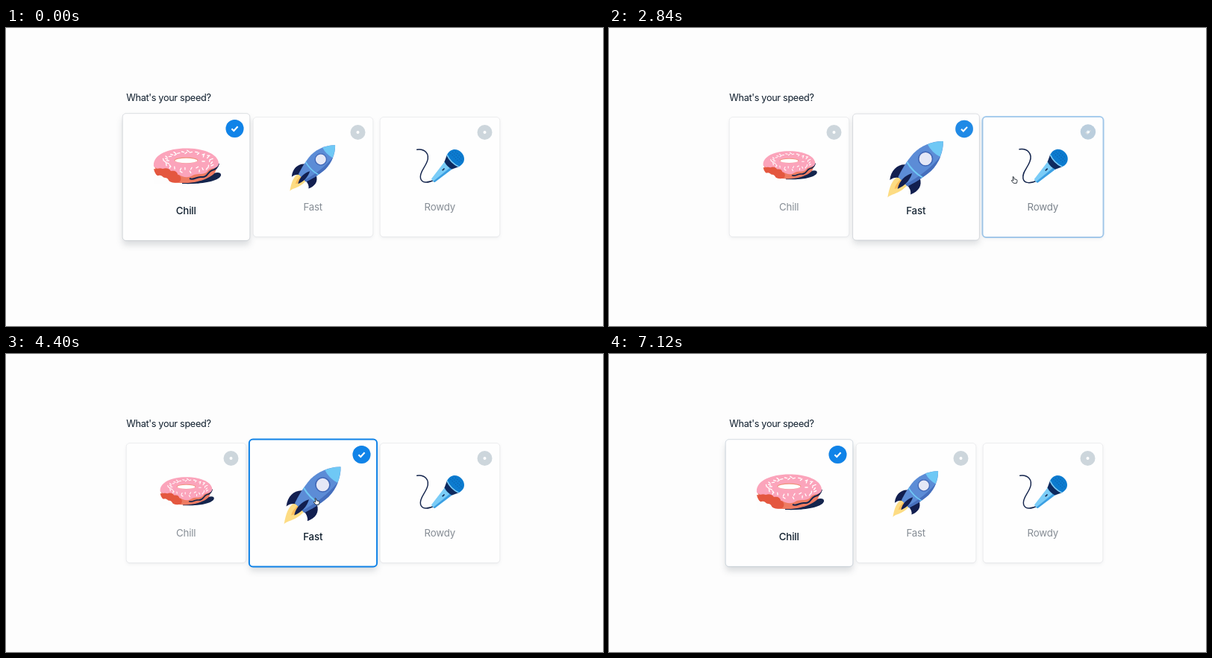
Animation, 800 px wide and 400 px high, one loop 7.52 s. Source, as an HTML page:

```html
<!DOCTYPE html>
<html lang="en">
<head>
<meta charset="utf-8">
<title>Speed picker</title>
<style>
  html, body { margin: 0; height: 100%; overflow: hidden; background: #fdfdfd; }
  svg { display: block; }
  text { font-family: Inter, "Liberation Sans", sans-serif; fill: #0f1e2d; }
  .title { font-size: 12.7px; letter-spacing: -.33px; }
  .label { font-size: 13.3px; letter-spacing: -.2px; text-anchor: middle; }
  .box { fill: #fefefe; }
  .ring { fill: none; stroke: #1083e8; stroke-width: 2; }
</style>
</head>
<body>
<svg id="stage" width="800" height="400" viewBox="0 0 800 400">
  <defs>
    <g id="donut" transform="translate(-241.5 -180)">
      <path fill="#14254d" d="M236 207C256 208 268 203 274 197C281 193 289 193 288 198C285 206 262 210 236 209Z"/>
      <path fill="#ee7b62" d="M199 186C204 201 218 209 240 208C258 208 275 201 280 194L285 182Z"/>
      <path fill="none" stroke="#14254d" stroke-width="2" d="M246 202C252 205 255 199 262 200C270 201 270 193 276 191C282 190 284 186 285 182"/>
      <path fill="#fba4bb" d="M198 186C196 171 216 161.500 241 161.500C268 161.500 285 171 285 182C284 190 275 187 271 191C266 199 256 194 250 198C244 202 236 200 232 197L208 192Z"/>
      <path fill="#e4573f" d="M198 189C202 190 205 187 210 189C215 187 219 189 221 192C226 191 230 193 230 197C235 198 236 204 232 207C225 209 219 207 216 203C214 200 210 203 207 201C204 202 199 195 198 189Z"/>
      <path fill="#fdfdfd" d="M197 193C201 195 201 199 205 198C209 197 210 201 213 201C218 201 218 206 221 209L198 210Z"/>
      <ellipse cx="241.500" cy="177.500" rx="16" ry="4" fill="#f0907a"/>
      <ellipse cx="241.500" cy="178" rx="15" ry="3.200" fill="#fefefe"/>
      <path id="sprinkles" fill="none" stroke="#fff" stroke-width="1.300" stroke-linecap="round"/>
    </g>
    <g id="rocket" transform="translate(-.5 9) rotate(45)">
      <path fill="#fddc83" d="M-9 24C-13 33-7 44 .7 55C1 47 8 42 8 25Z"/>
      <path fill="#fbbd5c" d="M-4 24Q-5 34-1 40Q3 34 4 24Z"/>
      <path fill="#121f50" d="M-13 5C-22 12-23 25-14 36Q-13 28-6 24ZM13 5C23 10 25 19 20 30Q16 24 6 24Z"/>
      <path fill="#5c8cd6" d="M0-53C10-44 17-28 17-13C16 3 12 16 9 25H-9C-12 16-16 3-17-13C-17-28-10-44 0-53Z"/>
      <path fill="#466fbd" d="M12-36C15-29 17-21 17-13C16 3 12 16 9 25H5C11 6 14-16 12-36Z"/>
      <path fill="#6fc8f5" d="M0-53C5-48 9-42 12-35Q0-31-12-35C-9-42-5-48 0-53Z"/>
      <path fill="none" stroke="#6fc8f5" stroke-width="2.200" d="M-15 2Q0 6 15 2"/>
      <path fill="#121f50" d="M1 8C6 17 6 28 2 37C-4 28-4 17 1 8Z"/>
      <circle cy="-19" r="9.500" fill="#e5e8f6" stroke="#4167b6" stroke-width="1.600"/>
    </g>
    <g id="mic" transform="translate(-581.5 -180)">
      <path fill="none" stroke="#14254d" stroke-width="1.800" stroke-linecap="round" d="M543 159C556 157 565 166 560 179C556 190 547 197 549 207C551 216 562 215 572 210"/>
      <g transform="translate(606 175) rotate(45)">
        <path fill="#7accf7" d="M-9 13H9L4 51Q0 53-4 51Z"/>
        <path fill="#3c9fe2" d="M5 13H9L4 51Q2 52 1 52Z"/>
        <path fill="#0e2a5f" d="M-14 4H14L9 15Q0 18-9 15Z"/>
        <path fill="#0c7bcf" d="M-14 4C-18-8-10-16 0-16C10-16 18-8 14 4Q0 8-14 4Z"/>
        <path fill="none" stroke="#0a5daa" stroke-width="1.200" stroke-dasharray="1.500 2.500" d="M-8-10H8M-11-6H11M-12-2H12"/>
        <path fill="none" stroke="#7accf7" stroke-width="2" d="M-14 4Q0 9 14 4"/>
        <path stroke="#14254d" stroke-width="2" d="M-1 23V28"/>
      </g>
    </g>
  </defs>
  <text class="title" x="161.300" y="97.500">What's your speed?</text>
  <g id="cards"></g>
  <g id="cursor" fill="#fff" stroke="#1a222c" stroke-width=".9" stroke-linejoin="round">
    <path id="hand" d="M-2-4.200Q-1.200-5-.6-4L.2-1.200L3-.6Q4.200-.2 4 1.500L3.200 4.300H-.8L-3.600 1.200Q-3.800 0-2.500 .3L-1.200 1Z"/>
    <path id="arrow" d="M-2.500-4.500V3.500L-.7 2L.6 4.600L1.900 4L.7 1.400H3.200Z"/>
  </g>
</svg>
<script>
const LOOP = 7520;
const $ = id => document.getElementById(id);
const clamp = v => Math.min(1, Math.max(0, v));
const smooth = v => { const u = clamp(v); return u * u * (3 - 2 * u); };
const lerp = (a, b, u) => a + (b - a) * u;

// Time spans during which each card is selected and focused
const cards = [
  { name: 'Chill', art: 'donut', x: 241.5, selected: [[-999, 1340], [5120, 9999]], focused: [[5120, 7020]] },
  { name: 'Fast', art: 'rocket', x: 411.5, selected: [[1340, 2800], [4160, 5120]], focused: [[1340, 2720], [4160, 5040]] },
  { name: 'Rowdy', art: 'mic', x: 581.5, selected: [[2800, 4160]], focused: [[2800, 4080]] }
];

// Pointer stops: time, x, y
const stops = [
  [500, 462, 410], [1080, 450, 206], [2130, 450, 206], [2680, 543, 204], [3640, 543, 204],
  [4040, 416, 198], [4420, 416, 198], [5020, 287, 196], [5820, 287, 196], [6660, 300, 408]
];

let sprinkles = '';
for (let i = 0; i < 42; i++) {
  const angle = i * 2.4, r = .56 + .35 * (i * .37 % 1), tilt = i * 1.9;
  const x = 241 + 42 * r * Math.cos(angle), y = 179 + 17 * r * Math.sin(angle);
  if (x < 232 && y > 188) continue;
  const dx = 1.6 * Math.cos(tilt), dy = 1.4 * Math.sin(tilt);
  sprinkles += `M${x - dx} ${y - dy}L${x + dx} ${y + dy}`;
}
$('sprinkles').setAttribute('d', sprinkles);

$('cards').innerHTML = cards.map(c => `
  <g transform="translate(${c.x} 0)">
    <rect class="box" rx="4.500"/>
    <rect class="ring" rx="5"/>
    <g class="art"><use href="#${c.art}"/></g>
    <g class="badge">
      <circle r="10" fill="#cdd6dc"/><circle r="2" fill="#fff"/>
      <g class="check"><circle r="10" fill="#1083e8"/>
        <path d="M-3.400 .2L-1 2.500L3.400-2.200" fill="none" stroke="#fff" stroke-width="1.800"/></g>
    </g>
    <text class="label" x="-.3">${c.name}</text>
  </g>`).join('');

cards.forEach((c, i) => {
  for (const part of ['box', 'ring', 'art', 'badge', 'check', 'label'])
    c[part] = $('cards').children[i].querySelector('.' + part);
});

function set(el, attrs) {
  for (const key in attrs) el.setAttribute(key, attrs[key]);
}

function level(t, spans, duration) {
  return spans.reduce((sum, [on, off]) =>
    sum + smooth((t - on) / duration) - smooth((t - off) / duration), 0);
}

function pointerAt(t) {
  const next = stops.findIndex(s => s[0] > t);
  if (next < 1) return [462, 420];
  const [t0, x0, y0] = stops[next - 1], [t1, x1, y1] = stops[next];
  const u = (t - t0) / (t1 - t0), e = u * (2 - u);
  return [lerp(x0, x1, e), lerp(y0, y1, e)];
}

const square = size => ({ x: -size / 2, y: 200 - size / 2, width: size, height: size });

function drawCard(c, t, px, py) {
  const p = level(t, c.selected, 220), f = level(t, c.focused, 110);
  const inside = Math.min(80 - Math.abs(px - c.x), 80 - Math.abs(py - 200));
  const hover = clamp(inside / 8);
  const size = lerp(160.6, 170.6, p);
  set(c.box, { ...square(size), stroke: `rgba(20,35,60,${.07 + .07 * Math.max(p, hover)})` });
  c.box.style.filter =
    `drop-shadow(0 ${lerp(2.5, 6, p)}px ${lerp(2, 4.5, p)}px rgba(20,35,50,${lerp(.06, .15, p)}))`;
  set(c.ring, { ...square(size + .6), opacity: f });
  set(c.art, { transform: `translate(0 180) scale(${lerp(.8, 1, p)})` });
  set(c.badge, { transform: `translate(${lerp(60, 65, p)} ${lerp(140, 135, p)}) scale(${lerp(1, 1.2, p)})` });
  set(c.check, { opacity: p });
  set(c.label, { y: lerp(245, 250, p), 'fill-opacity': lerp(.5, 1, p), 'font-weight': p > .5 ? 500 : 400 });
  return inside > 0;
}

function frame(now) {
  const t = now % LOOP, [x, y] = pointerAt(t);
  const over = cards.map(c => drawCard(c, t, x, y)).some(Boolean);
  set($('cursor'), { transform: `translate(${x} ${y})` });
  set($('hand'), { opacity: +over });
  set($('arrow'), { opacity: +!over });
  requestAnimationFrame(frame);
}
frame(performance.now());
</script>
</body>
</html>
```
